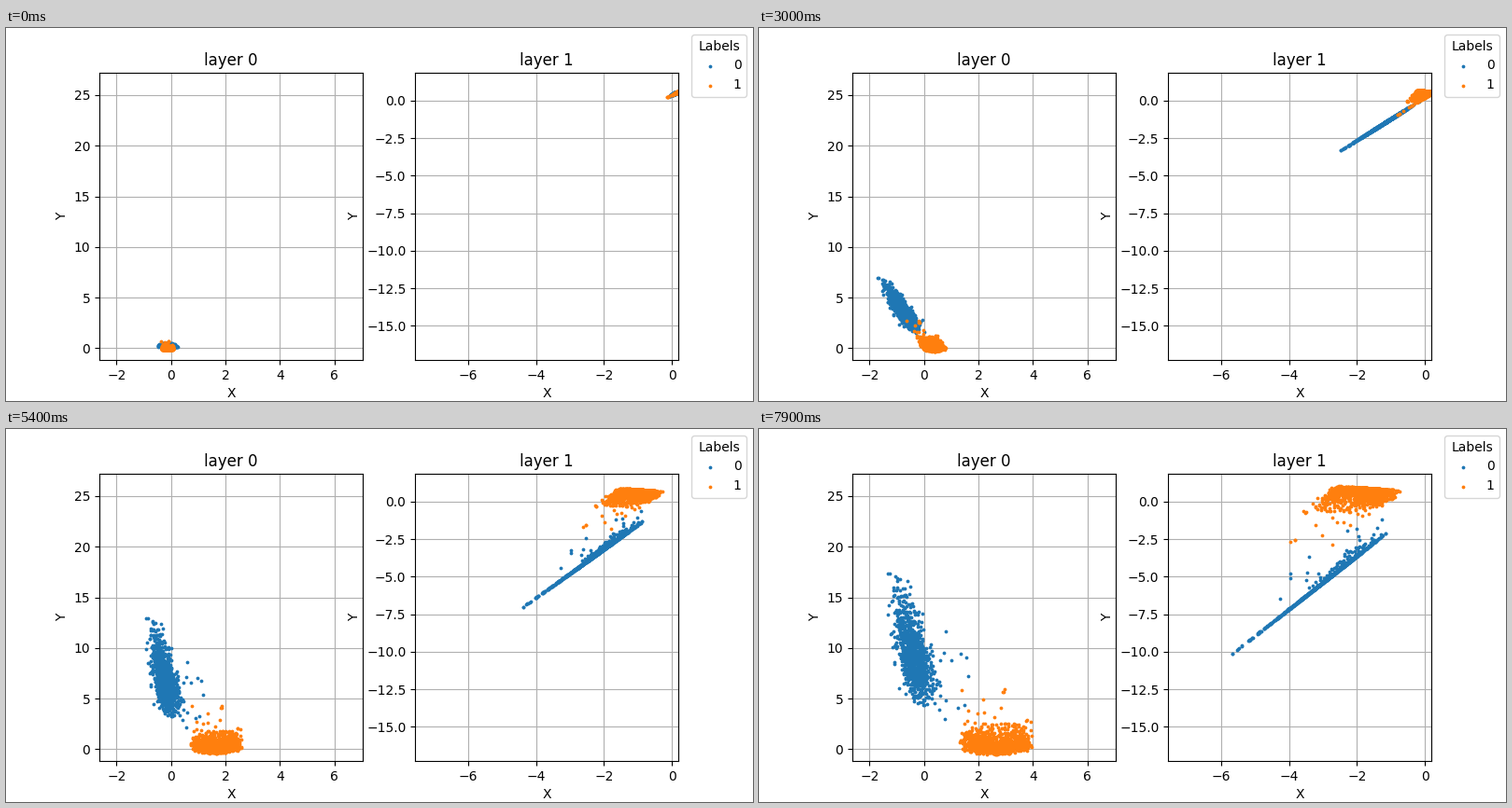
A matplotlib script that plays this animation: 800x400 px, repeating every 8000 ms.

```python
import numpy as np
import matplotlib.pyplot as plt
from matplotlib.animation import FuncAnimation

FRAMES, STEP = 80, 100
COUNT = 1000
rng = np.random.default_rng(7)

# Blue cloud: place along its length, across it, and extra drift of strays
along = np.clip((rng.gamma(16, 1, COUNT) - 16) / 4, -2.2, 3.2)
across = np.clip(rng.normal(0, 1, COUNT), -3, 3)
stray = np.zeros(COUNT)
along[:32] = np.clip(rng.normal(-0.9, 0.9, 32), -3, 0.8)
stray[:32] = np.minimum(0.4 + rng.exponential(0.4, 32), 2.1)

# Orange cloud: place from side to side, and height above its round rim
side = 2 * rng.beta(2, 2, COUNT) - 1
height = np.minimum(rng.gamma(2.3, 0.44, COUNT), 3)
side[:10] = rng.uniform(-0.95, 0.3, 10)
height[:10] = rng.uniform(3.5, 6.4, 10)


def rise(t, mid, width):
    return 1 / (1 + np.exp((mid - t) / width))


def swing(t):
    """Early sway to the left, over by about 4 s."""
    return np.exp(-((t - 2.1) / 1.55) ** 4)


def blue_points(t):
    level = 0.25 + 14 * (rise(t, 3.6, 2.4) - rise(0, 3.6, 2.4))
    centre = -0.1 - 0.8 * swing(t) - 0.32 * rise(t, 5.4, 0.4)
    lean = -0.0215 * t - 0.17 * swing(t)
    width = 0.12 + 0.0021 * t ** 2
    x = centre + lean * along + width * across + rise(t, 4.7, 0.9) * stray
    y = level * (1 + 0.245 * along) + 0.03 * along
    return np.column_stack([x, y])


def orange_points(t):
    spread = rise(t, 4.9, 1.3)
    scale = 0.14 + 0.11 * t
    x = (-0.2 + 3.1 * spread + (0.2 + 1.3 * spread) * side
         - 0.12 * swing(t) * height)
    y = -0.12 - 0.43 * scale + scale * (height + 0.55 * side ** 2)
    return np.column_stack([x, y])


def next_layer(points, t):
    """ReLU followed by a slowly learned linear map."""
    bias = [0.2 + 0.019 * t, 0.61 - 0.006 * t]
    weights = [[-0.78 + 0.53 * np.exp(-t / 2.2), 0.125],
               [-0.33 - 0.15 * np.exp(-t / 3.5), -0.53 - 0.0105 * t]]
    return np.maximum(points, 0) @ weights + bias


fig, axes = plt.subplots(1, 2, figsize=(8, 4), dpi=100)
limits = [((-2.632, 7.038), (-1.153, 27.21)),
          ((-7.555, 0.185), (-17.272, 1.86))]
dots = []
for i, (ax, (xlim, ylim)) in enumerate(zip(axes, limits)):
    dots.append([ax.scatter([], [], s=3, color=c, label=str(n), zorder=2.2)
                 for n, c in enumerate(("C0", "C1"))])
    ax.set(title=f"layer {i}", xlabel="X", ylabel="Y", xlim=xlim, ylim=ylim)
    ax.set_axisbelow(True)
    ax.grid(True)
fig.legend(handles=dots[0], title="Labels", loc="upper right")


def update(frame):
    t = frame * STEP / 1000
    for n, points in enumerate((blue_points(t), orange_points(t))):
        dots[0][n].set_offsets(points)
        dots[1][n].set_offsets(next_layer(points, t))
    return dots[0] + dots[1]


anim = FuncAnimation(fig, update, frames=FRAMES, interval=STEP, repeat=True)
plt.show()
```
